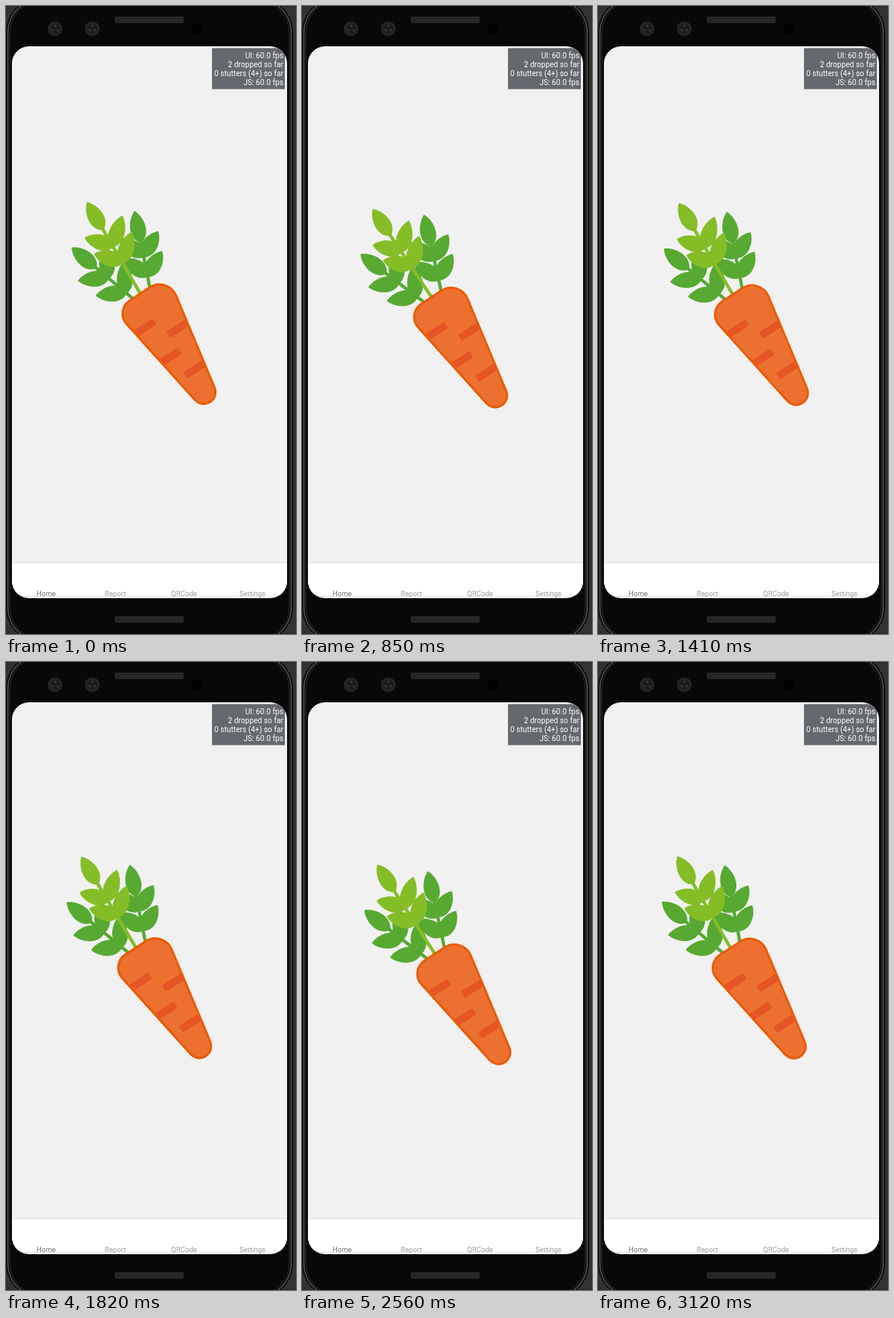
Animation, 390 px wide and 842 px high, one loop 3170 ms. Source, as an HTML page with a canvas:

```html
<!DOCTYPE html>
<html lang="en">
<head>
<meta charset="utf-8">
<title>Carrot loader</title>
<style>
  html, body { margin: 0; width: 100%; height: 100%; overflow: hidden; background: #060606; }
  canvas, svg { position: absolute; left: 0; top: 0; width: 390px; height: 842px; display: block; }
  text { font-family: Roboto, Arial, sans-serif; }
  .stats { font-size: 10.2px; fill: #fff; text-anchor: end; }
  .tabs { font-size: 9.65px; fill: #9a9a9b; text-anchor: middle; }
  .tabs .on { fill: #676b70; }
</style>
</head>
<body>
<canvas id="stage"></canvas>
<svg viewBox="0 0 390 842">
  <g class="stats">
    <text x="373" y="70">UI: 60.0 fps</text>
    <text x="373" y="82">2 dropped so far</text>
    <text x="373" y="94">0 stutters (4+) so far</text>
    <text x="373" y="106">JS: 60.0 fps</text>
  </g>
  <g class="tabs">
    <text class="on" x="54" y="791">Home</text>
    <text x="147" y="791">Report</text>
    <text x="239.5" y="791">QRCode</text>
    <text x="331.5" y="791">Settings</text>
  </g>
</svg>
<script>
const W = 390, H = 842, PHONE = 386, LOOP = 3170, CYCLE = 1480;
const DARK = '#57a932', LIGHT = '#85bd27';
const canvas = document.getElementById('stage');
const ctx = canvas.getContext('2d');
const dpr = window.devicePixelRatio || 1;
canvas.width = W * dpr;
canvas.height = H * dpr;

// Leaf pairs start `first` below the tip and repeat every `step`.
const sprigs = [
  { color: DARK, root: [176, 397], tip: [88.5, 324], first: 35, step: 31, left: 29, right: 30, swing: 0.055 },
  { color: DARK, root: [195, 385], tip: [173, 275], first: 33, step: 27, left: 27, right: 26, swing: 0.025 },
  { color: LIGHT, root: [185, 393], tip: [109, 263], first: 40, step: 25, left: 27, right: 32, swing: 0.064 }
];

// The root is a long triangle with rounded corners.
const body = new Path2D();
body.moveTo(190, 379.9);
body.arcTo(217.7, 361.8, 316.8, 597.8, 24);
body.arcTo(316.8, 597.8, 146, 408.7, 15.85);
body.arcTo(146, 408.7, 217.7, 361.8, 21);
body.closePath();

function box(x, y, w, h, r, fill) {
  ctx.beginPath();
  ctx.roundRect(x, y, w, h, r);
  if (fill) {
    ctx.fillStyle = fill;
    ctx.fill();
  }
}

function rim(inset, color, width) {
  box(inset, -12 + inset, PHONE - 2 * inset, H + 24 - 2 * inset, 48 - inset);
  ctx.strokeStyle = color;
  ctx.lineWidth = width;
  ctx.stroke();
}

function disc(x, y, r, fill) {
  ctx.beginPath();
  ctx.arc(x, y, r, 0, 2 * Math.PI);
  ctx.fillStyle = fill;
  ctx.fill();
}

function speaker(y) {
  box(146, y, 93, 9, 2, '#222');
  ctx.fillStyle = '#373737';
  for (let row = 0; row < 4; row++)
    for (let x = 147 + row % 2; x < 238; x += 2) ctx.fillRect(x, y + 1 + row * 2, 1, 1);
}

function sensor(x, y) {
  disc(x, y, 10, '#232323');
  disc(x, y, 6.5, '#1a1a1a');
  for (let i = 0; i < 3; i++) {
    const a = 0.6 + i * 2 * Math.PI / 3;
    disc(x + 4 * Math.cos(a), y + 4 * Math.sin(a), 1.4, '#3e3e3e');
  }
}

function phone() {
  ctx.fillStyle = '#32312f';
  ctx.fillRect(0, 0, W, H);
  box(0, -12, PHONE, H + 24, 48, '#080808');
  rim(2.5, '#565656', 1.5);
  rim(5, '#303030', 1);
  speaker(14);
  speaker(818);
  sensor(66, 30.5);
  sensor(116, 30.5);
  disc(257, 31, 7, '#000');

  ctx.save();
  box(8, 54, 370, 740, 23, '#f1f1f1');
  ctx.clip();
  ctx.fillStyle = '#dedede';
  ctx.fillRect(8, 746, 370, 1.2);
  ctx.fillStyle = '#fff';
  ctx.fillRect(8, 747.2, 370, 43);
  ctx.fillStyle = '#65696f';
  ctx.fillRect(277, 56.5, 98, 55);
  ctx.restore();
}

// Drawn from its pointed tip towards the stem.
function leaf(x, y, bx, by) {
  const len = Math.hypot(bx - x, by - y), h = 10.7;
  ctx.save();
  ctx.translate(x, y);
  ctx.rotate(Math.atan2(by - y, bx - x));
  ctx.beginPath();
  ctx.moveTo(0, 0);
  ctx.bezierCurveTo(len * 0.22, h, len * 0.78, h * 1.6, len, 0);
  ctx.bezierCurveTo(len * 0.78, -h * 1.6, len * 0.22, -h, 0, 0);
  ctx.fill();
  ctx.restore();
}

function sprig({ color, root, tip, first, step, left, right, swing }, sway) {
  const dx = tip[0] - root[0], dy = tip[1] - root[1];
  const len = Math.hypot(dx, dy);
  ctx.save();
  ctx.translate(...root);
  ctx.rotate(Math.atan2(dy, dx) + swing * sway);
  ctx.fillStyle = color;
  ctx.fillRect(0, -2.2, len - 30, 4.4);
  leaf(len, 0, len - 44, 0);
  for (let i = 0; i < 2; i++) {
    const at = len - first - i * step;
    leaf(at, -left, at - 30, 2);
    leaf(at, right, at - 30, -2);
  }
  ctx.restore();
}

function stripe(x, y) {
  ctx.save();
  ctx.translate(x, y);
  ctx.rotate(-0.57);
  box(-15, -5, 30, 10, 1.5, '#e65525');
  ctx.restore();
}

function carrotRoot() {
  ctx.fillStyle = '#ec7130';
  ctx.fill(body);
  ctx.save();
  ctx.clip(body);
  for (let i = 0; i < 2; i++) {
    stripe(187.5 + 34 * i, 431.5 + 39 * i);
    stripe(231 + 23 * i, 433 + 54.5 * i);
  }
  ctx.restore();
  ctx.strokeStyle = '#ea5b04';
  ctx.lineWidth = 3;
  ctx.stroke(body);
}

// Cosine wave over one cycle, highest at the given time.
const wave = (t, peak) => Math.cos(2 * Math.PI * (t - peak) / CYCLE);

function draw(t) {
  ctx.setTransform(dpr, 0, 0, dpr, 0, 0);
  phone();
  ctx.translate(-4 + 4.6 * wave(t, 1340), 1.1 + 4.2 * wave(t, 1030));
  const sway = (wave(t, 100) - wave(0, 100)) / 2;
  sprigs.forEach(s => sprig(s, sway));
  carrotRoot();
}

const start = performance.now();
function tick() {
  draw((performance.now() - start) % LOOP);
  requestAnimationFrame(tick);
}
tick();
</script>
</body>
</html>
```
